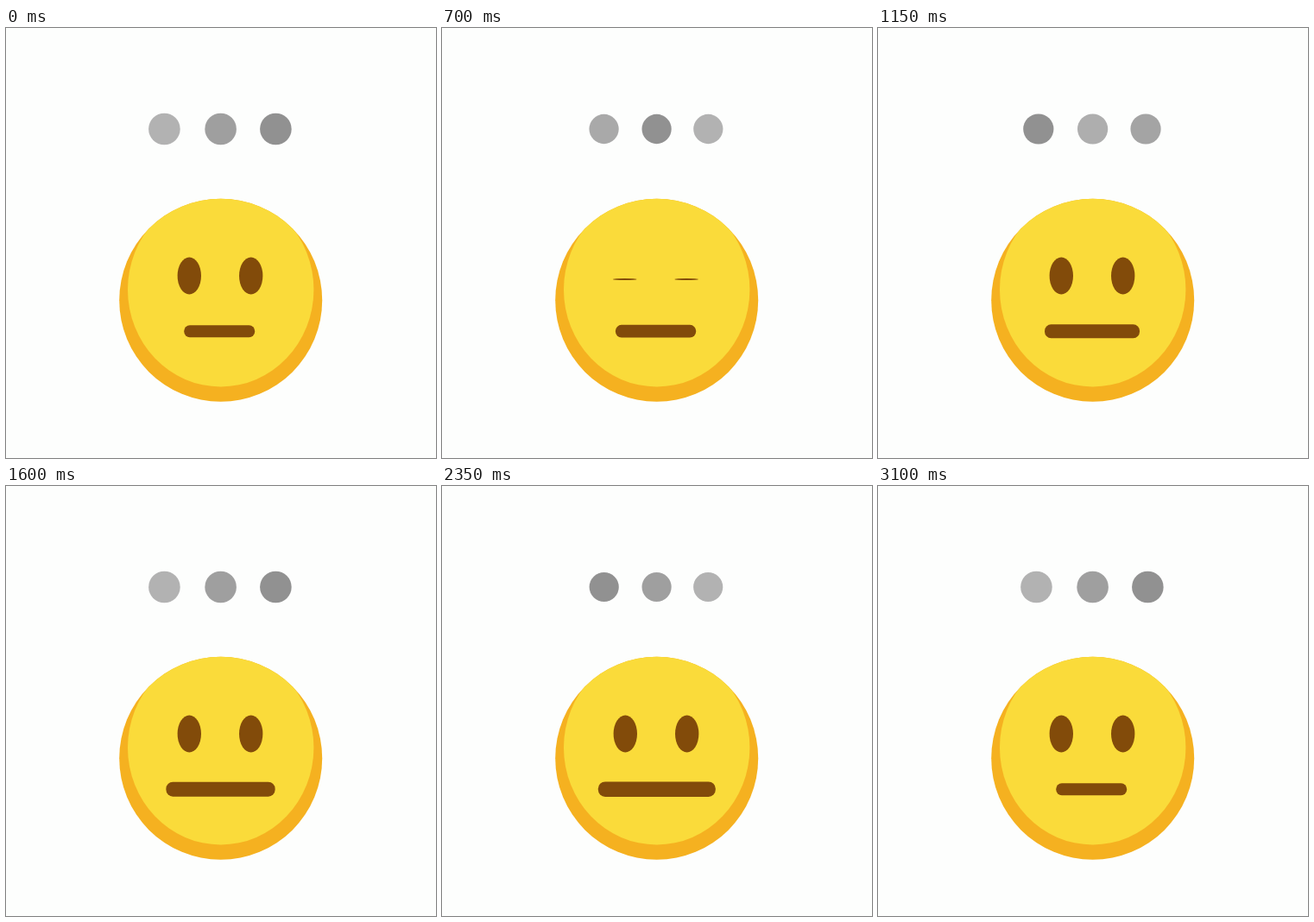
Write an HTML page with a canvas that moves like this. It is 498x498 px and loops after 3.15 s.

```html
<!DOCTYPE html>
<html>
<head>
<meta charset="utf-8">
<style>
html, body { margin: 0; width: 100%; height: 100%; overflow: hidden; background: #fdfefd; }
canvas { display: block; }
</style>
</head>
<body>
<canvas id="stage" width="498" height="498"></canvas>
<script>
const ctx = document.getElementById('stage').getContext('2d');
const LOOP = 3150, STEP = 50;
const BROWN = '#824b0a';

// Grey levels of the three dots over time
const L = 178, M = 159, D = 145;
const shades = [
  [0, L, M, D], [700, 169, D, L], [1150, D, 174, 164], [1600, L, M, D],
  [2000, D, M, L], [2700, D, M, L], [3100, L, M, D], [LOOP, L, M, D]
];

const clamp = x => Math.max(0, Math.min(1, x));
const mix = (a, b, k) => a + (b - a) * k;
const ease = x => (1 - Math.cos(Math.PI * clamp(x))) / 2;
const ramp = (t, from, to) => ease((t - from) / (to - from));

function oval(x, y, rx, ry, color) {
  ctx.fillStyle = color;
  ctx.beginPath();
  ctx.ellipse(x, y, rx, ry, 0, 0, Math.PI * 2);
  ctx.fill();
}

function drawDots(t) {
  let i = 0;
  while (i < shades.length - 2 && t >= shades[i + 1][0]) i++;
  const a = shades[i], b = shades[i + 1];
  const k = (t - a[0]) / (b[0] - a[0]);
  const s = 0.967 + 0.033 * Math.cos(2 * Math.PI * t / (LOOP / 2));
  [-65.2, 0, 63.8].forEach((dx, n) => {
    const g = Math.round(mix(a[n + 1], b[n + 1], k));
    oval(248.6 + dx * s, 117, 18.3 * s, 18.3 * s, `rgb(${g},${g},${g})`);
  });
}

function drawHead() {
  oval(248.7, 315.3, 117.5, 117.5, '#f5b120');
  ctx.save();
  ctx.beginPath();
  ctx.arc(248.7, 315.3, 117.5, 0, Math.PI * 2);
  ctx.clip();
  oval(248.7, 303, 107.7, 112.5, '#fadb3a');
  ctx.restore();
}

function drawEyes(t) {
  const gap = Math.min(Math.abs(t - 700), Math.abs(t - 2050));
  const open = mix(0.05, 1, ease(gap / 150));
  for (const x of [212.3, 283.7])
    oval(x - 0.6 * (1 - open), 291.2 - 4.2 * open, 13.7, 21.5 * open, BROWN);
}

function drawMouth(t) {
  const k = ramp(t, 50, 2200) - ramp(t, 2500, 3100);
  const w = mix(82, 136, k), h = mix(14, 17.6, k);
  ctx.fillStyle = BROWN;
  ctx.beginPath();
  ctx.roundRect(mix(247.2, 248.8, k) - w / 2, 351.2 - h / 2, w, h, mix(6.7, 8.2, k));
  ctx.fill();
}

function draw(t) {
  ctx.fillStyle = '#fdfefd';
  ctx.fillRect(0, 0, 498, 498);
  drawDots(t);
  drawHead();
  drawEyes(t);
  drawMouth(t);
}

const start = performance.now();
function tick() {
  const t = (performance.now() - start) % LOOP;
  draw(Math.floor(t / STEP) * STEP);
  requestAnimationFrame(tick);
}
tick();
</script>
</body>
</html>
```
